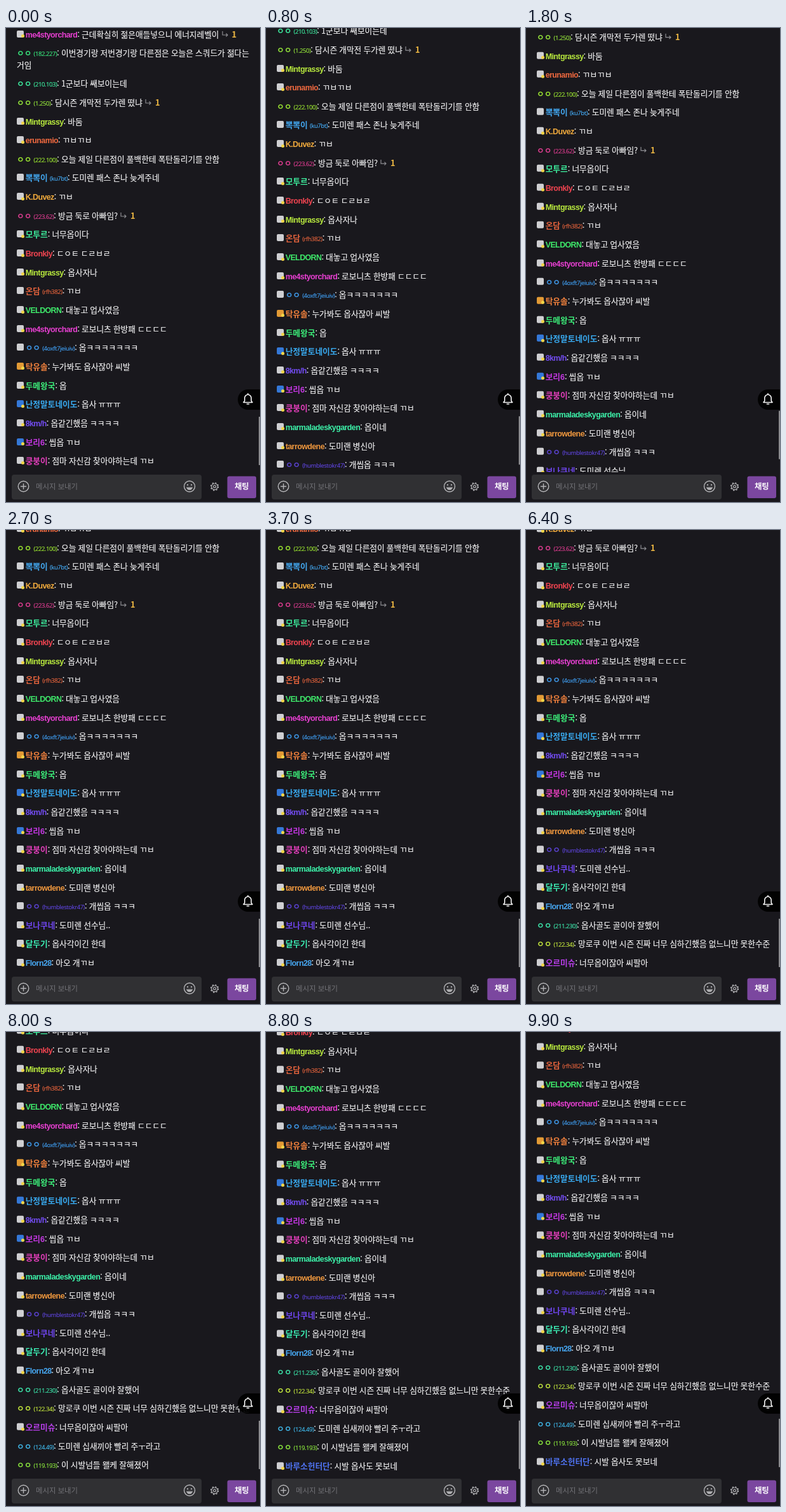
An HTML page that plays this animation: 400x745 px, repeating every 10000 ms.

```html
<!DOCTYPE html>
<html lang="ko">
<head>
<meta charset="utf-8">
<style>
html, body { margin: 0; width: 100%; height: 100%; overflow: hidden; background: #19181d; }
#stage { position: relative; width: 400px; height: 745px; overflow: hidden; font: 12.7px "Noto Sans CJK KR", "Noto Sans CJK", sans-serif; }
#view { position: absolute; inset: 0 0 47px; overflow: hidden; }
.row { position: absolute; left: 17px; line-height: 18.4px; white-space: nowrap; word-spacing: -.4px; color: #f3f3f4; -webkit-text-stroke: .15px; }
.row.member { padding-left: 13.7px; }
.row b { line-height: 0; font-family: "Liberation Sans", "Noto Sans CJK KR", "Noto Sans CJK", sans-serif; -webkit-text-stroke: 0; }
.row b.latin { font-size: 12.4px; letter-spacing: -.55px; }
.row small { font: 9.5px/0 "Noto Sans", sans-serif; letter-spacing: -.45px; }
.row u { line-height: 0; text-decoration: none; color: #eab543; font-weight: bold; margin-left: 6px; }
.row svg { width: 10px; height: 10px; margin-left: 4px; }
.badge { position: absolute; left: 0; top: 3px; width: 11px; height: 11px; border-radius: 2px; }
.badge.star::after { content: ""; position: absolute; left: 6.5px; top: 6.5px; width: 5px; height: 5px; border-radius: 50%; background: #f3d648; }
#thumb { position: absolute; left: 398px; top: 611px; width: 2px; height: 76px; background: #8b8b8e; }
#ui { position: absolute; left: 0; top: 0; }
</style>
</head>
<body>
<div id="stage">
  <div id="view"><div id="list"></div></div>
  <div id="thumb"></div>
  <svg id="ui" width="400" height="745" fill="none" stroke-linecap="round" stroke-linejoin="round">
    <path d="M400 568H381a16 16 0 0 0 0 32H400z" fill="#000" fill-opacity=".93"/>
    <g stroke="#f4f4f4" stroke-width="1.6">
      <path d="M374 588.5h14l-1.8-2.5v-4.5a5.2 5.2 0 0 0-10.4 0v4.5z"/>
      <path d="M381 575.8v-1.3M379.4 591h3.2"/>
    </g>
    <rect x="9" y="702" width="299" height="39" rx="4" fill="#303033"/>
    <g stroke="#b4b4b7" stroke-width="1.4">
      <circle cx="27.5" cy="720.5" r="8.3"/>
      <path d="M23.5 720.5h8M27.5 716.5v8"/>
      <circle cx="289" cy="720.5" r="8.5"/>
      <path d="M284.5 722.5a4.7 4.7 0 0 0 9 0z" fill="#b4b4b7" stroke-width=".8"/>
      <path d="M286 718v.2M292 718v.2" stroke-width="2.2"/>
      <circle cx="328.5" cy="720.8" r="4.8" stroke-width="1.2"/>
      <circle cx="328.5" cy="720.8" r="1.9" stroke-width="1.2"/>
      <circle cx="328.5" cy="720.8" r="6" stroke-width="1.4" stroke-linecap="butt" stroke-dasharray="2.3 2.41"/>
    </g>
    <text x="47" y="724.5" font-size="11.4" fill="#737378">메시지 보내기</text>
    <rect x="348.5" y="704.5" width="45.5" height="34.5" rx="3" fill="#7b479f"/>
    <text x="371.3" y="725" font-size="12.4" font-weight="bold" text-anchor="middle" fill="#fff">채팅</text>
  </svg>
</div>
<script>
const PITCH = 29.65, LOOP = 10000, DURATION = 1000;
const BADGES = { s: '#cfcfd2', p: '#cfcfd2', b: '#3478d8', o: '#e29a35' };

// badge | colour | name | id | message | replies
const rows = `s|e63fd0|me4styorchard||근데확실히 젊은애들넣으니 에너지레벨이|1
|38e07a|ㅇㅇ|182.227|이번경기랑 저번경기랑 다른점은 오늘은 스쿼드가 젊다는<br>거임
|3ce69c|ㅇㅇ|210.103|1군보다 쌔보이는데
|92e03a|ㅇㅇ|1.250|담시즌 개막전 두가렌 떴냐|1
s|b9ea3e|Mintgrassy||바둠
s|f0693f|erunamio||ㄲㅂㄲㅂ
|98e030|ㅇㅇ|222.100|오늘 제일 다른점이 풀백한테 폭탄돌리기를 안함
p|42a6ee|뽁뽁이|ku7bt|도미렌 패스 존나 늦게주네
s|f0aa3c|K.Duvez||ㄲㅂ
|da3c8e|ㅇㅇ|223.62|방금 둑로 아빠임?|1
s|3ce89a|모투르||너무옵이다
s|f04450|Bronkly||ㄷㅇㅌ ㄷㄹㅂㄹ
s|b9ea3e|Mintgrassy||옵사자나
p|e2623c|온담|rfh382|ㄲㅂ
s|3ee86a|VELDORN||대놓고 업사였음
s|e63fd0|me4styorchard||로보니츠 한방패 ㄷㄷㄷㄷ
p|3e98e8|ㅇㅇ|4oxft7jeiuiv|옵ㅋㅋㅋㅋㅋㅋㅋ
o|f0803c|탁유솔||누가봐도 옵사잖아 씨발
s|3cee7a|두메왕국||옵
b|38aaf0|난정말토네이도||옵사 ㅠㅠㅠ
s|724cf0|8km/h||옵같긴했음 ㅋㅋㅋㅋ
b|c236e0|보리6||씹옵 ㄲㅂ
s|e23eba|쿵붕이||점마 자신감 찾아야하는데 ㄲㅂ
s|3cf0a8|marmaladeskygarden||옵이네
s|f0983e|tarrowdene||도미랜 병신아
p|5a42d0|ㅇㅇ|humblestokr47|개씹옵 ㅋㅋㅋ
s|6c44e8|보나쿠네||도미렌 선수님..
s|3cf0b6|달두기||옵사각이긴 한데
s|46a6f0|Florn28||아오 개ㄲㅂ
|3ce2a8|ㅇㅇ|211.230|옵사골도 골이야 잘했어
|c0e23c|ㅇㅇ|122.34|망로쿠 이번 시즌 진짜 너무 심하긴했음 없느니만 못한수준
s|b63ee8|오르미슈||너무옵이잖아 씨팔아
|3eb2e2|ㅇㅇ|124.49|도미렌 십새끼야 빨리 주ㅜ라고
|88e23c|ㅇㅇ|119.193|이 시발넘들 왤케 잘해졌어
s|4e72f0|바루소헌터단||시발 옵사도 못보네`.split('\n').map(line => line.split('|'));

const arrow = '<svg viewBox="0 0 10 10" fill="none" stroke="#8d8d92" stroke-width="1.2"><path d="M1 0v6h8M6.5 3.5 9 6 6.5 8.5"/></svg>';

function rowHtml([badge, color, name, id, message, replies], index) {
  const top = 10.3 + index * PITCH + (index > 1 ? 18.4 : 0) - 9.8;
  const icon = badge && `<i class="badge ${badge === 'p' ? '' : 'star'}" style="background:${BADGES[badge]}"></i>`;
  const latin = /^[\x20-\x7e]+$/.test(name) ? 'latin' : '';
  const tag = id && ` <small>(${id})</small>`;
  const reply = replies ? `${arrow}<u>${replies}</u>` : '';
  return `<div class="row ${badge && 'member'}" style="top:${top}px">${icon}` +
    `<span style="color:#${color}"><b class="${latin}">${name}</b>${tag}</span>: ${message}${reply}</div>`;
}

const list = document.getElementById('list');
const thumb = document.getElementById('thumb');
list.innerHTML = rows.map(rowHtml).join('');

// [start time, messages arriving]
const batches = [[58, 3], [1458, 3], [3958, 3], [6950, 2], [8058, 1], [9558, 1]];
const ease = p => p < .5 ? 4 * p ** 3 : 1 - 4 * (1 - p) ** 3;

function draw(now) {
  const t = now % LOOP;
  let scroll = 0, bottom = 0;
  for (const [start, count] of batches) {
    if (t < start) break;
    bottom += count * PITCH;
    scroll += count * PITCH * ease(Math.min(1, (t - start) / DURATION));
  }
  list.style.transform = `translateY(${-scroll}px)`;
  thumb.style.transform = `translateY(${(scroll - bottom) / 8}px)`;
  requestAnimationFrame(draw);
}
draw(0);
</script>
</body>
</html>
```
